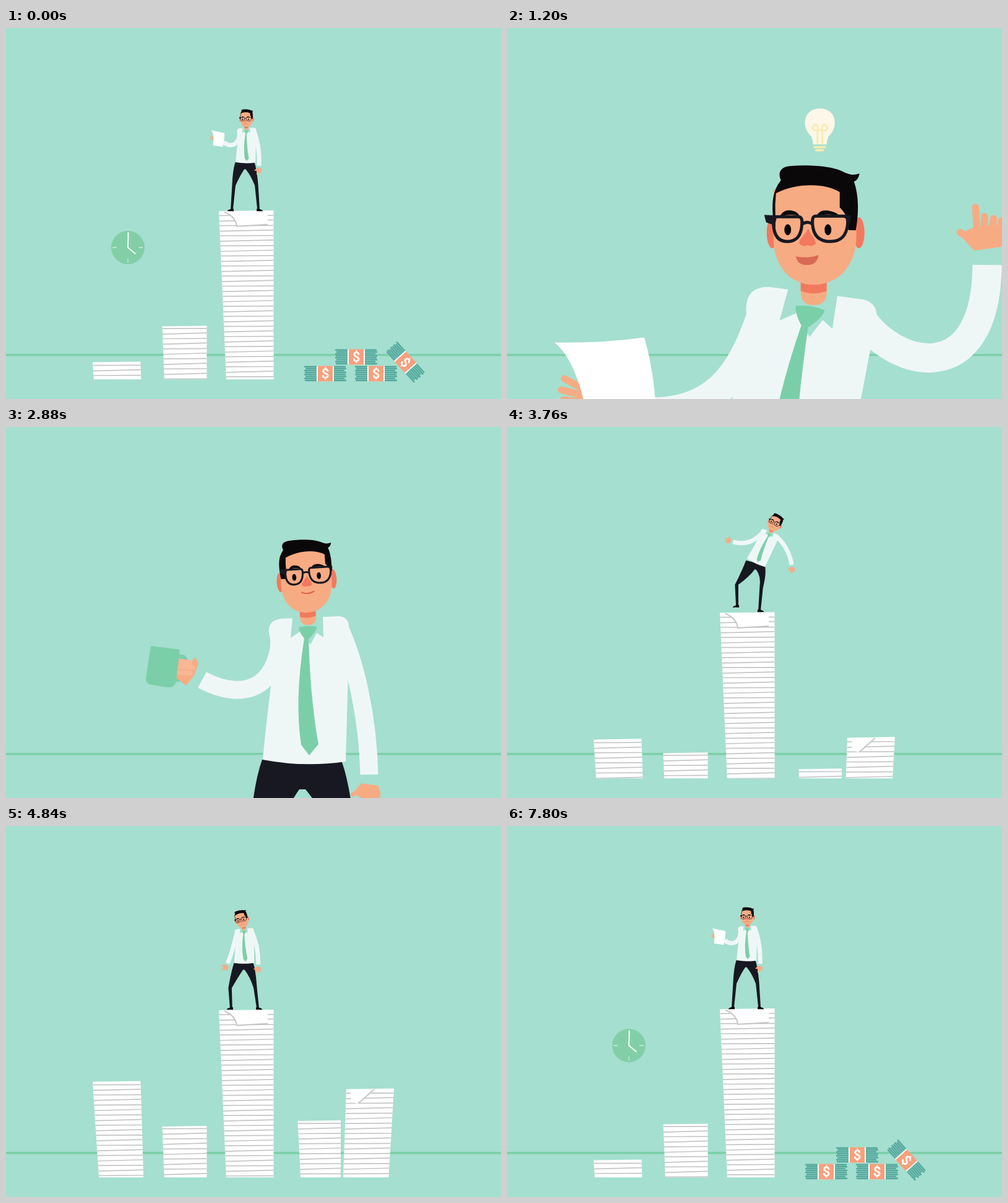
These frames come from a looping animation (800x600 px, 7840 ms). An HTML page with a canvas:

```html
<!DOCTYPE html>
<html lang="en">
<head>
<meta charset="utf-8">
<title>Paperwork</title>
<style>
html, body { margin: 0; width: 100%; height: 100%; overflow: hidden; background: #a5dfcf; }
canvas { display: block; }
</style>
</head>
<body>
<canvas id="stage" width="800" height="600"></canvas>
<script>
const c = document.getElementById('stage').getContext('2d');
const LOOP = 7840, RAD = Math.PI / 180, FLOOR = 568.5;
const BG = '#a5dfcf', GREEN = '#7bcfa8', SHIRT = '#eff7f6', SKIN = '#f7ab83', RED = '#f2795d',
  HAIR = '#0b080a', DARK = '#171821', GREY = '#c6c6c6';

// ---------- timing helpers ----------
const clamp = u => Math.max(0, Math.min(1, u));
const smooth = u => u * u * (3 - 2 * u);
const span = (t, a, b) => clamp((t - a) / (b - a));
const backOut = u => 1 + 2.7 * (u - 1) ** 3 + 1.7 * (u - 1) ** 2;
const mix = (a, b, u) => Array.isArray(a) ? a.map((v, i) => mix(v, b[i], u)) : a + (b - a) * u;

function track(t, keys, ease = u => u) {
  let i = 0;
  while (i < keys.length - 2 && t >= keys[i + 1][0]) i++;
  const [a, b] = [keys[i], keys[i + 1]];
  return mix(a[1], b[1], ease(span(t, a[0], b[0])));
}

// ---------- drawing helpers ----------
function group(x, y, angle, scale, draw) {
  if (scale <= 0.01) return;
  c.save();
  c.translate(x, y);
  c.rotate(angle * RAD);
  c.scale(scale, scale);
  draw();
  c.restore();
}
function fill(d, color) { c.fillStyle = color; c.fill(new Path2D(d)); }
function stroke(d, color, width, cap = 'butt') {
  c.strokeStyle = color;
  c.lineWidth = width;
  c.lineCap = cap;
  c.lineJoin = 'round';
  c.stroke(new Path2D(d));
}
function ellipse(x, y, rx, ry, color) {
  c.fillStyle = color;
  c.beginPath();
  c.ellipse(x, y, rx, ry, 0, 0, 7);
  c.fill();
}
function rotate([x, y], angle) {
  const k = Math.cos(angle * RAD), s = Math.sin(angle * RAD);
  return [x * k - y * s, x * s + y * k];
}

// ---------- poses: limbs are measured from the hip ----------
// body: x, y, scale, lean, head tilt, face shift x, y; mood: mouth, eyes; held: paper, mug, paper angle, hand flip
const armDown = [80, -160, 95, -70, 92, 20], armUp = [125, -155, 218, -131, 219, -257];
const armHold = [-37, -132, -87, -93, -147, -138];
const reading = {
  body: [387, 218, .24, 0, 0, 0, 6], mood: [-1, 1], held: [1, 0, 15, -1],
  left: armHold, right: armDown, legs: [-79, 154, -92, 317, 75, 154, 88, 317]
};
const pose = (base, change) => ({ ...base, ...change });
const close = pose(reading, {
  body: [419, 802, 1.63, 10, 0, 0, 0], mood: [0, 1], held: [1, 0, 0, -1],
  left: [-20, -160, -42, -110, -116, -111]
});
const idea = pose(close, { mood: [1, 1], held: [1, 0, 0, 1], right: armUp });
const medium = pose(idea, { body: [482, 542, 1, 4, 0, 6, 0], held: [0, 0, 0, 1], left: armHold });
const coffee = pose(medium, {
  body: [482, 542, 1, 0, -4, 13, -6], mood: [.5, 1], held: [0, 1, 0, -1],
  left: [-37, -132, -87, -92, -165, -133], right: [83, -162, 103, -72, 105, 20]
});
const relaxed = pose(reading, { mood: [-.3, .1], held: [0, 0, 15, -1], left: [-70, -140, -80, -60, -88, 20] });
const landed = pose(relaxed, { body: [387, 224, .24, -4, 0, 0, 0], mood: [-.5, 1] });
const topple = pose(landed, {
  body: [402, 220, .24, 24, 26, 0, 0], mood: [-1, 1],
  left: [-8, -142, -71, -122, -154, -142], right: [188, -138, 229, -71, 242, 12],
  legs: [-129, 146, -125, 290, 38, 167, 25, 321]
});
const sway = pose(topple, {
  body: [384, 221, .24, -9, -10, 0, 0], left: [-110, -150, -150, -100, -170, -40],
  right: [100, -160, 140, -90, 160, -10], legs: [-90, 160, -84, 310, 78, 160, 97, 310]
});
const slump = pose(relaxed, {
  body: [385, 222, .24, -2, -15, 0, 5], mood: [-1, 1], left: [-71, -133, -79, -71, -112, 0],
  right: [82, -150, 96, -70, 95, 8], legs: [-96, 167, -88, 304, 75, 167, 92, 304]
});
const script = [
  [0, reading], [280, reading], [760, close], [840, close], [1080, idea], [1400, idea],
  [1700, medium], [2040, medium], [2480, coffee], [2920, coffee], [3180, landed], [3380, landed],
  [3740, topple], [3880, topple], [4260, sway], [4700, slump], [5000, slump], [5480, relaxed],
  [6480, relaxed], [6960, reading], [LOOP, reading]
];
function poseAt(t) {
  let i = 0;
  while (i < script.length - 2 && t >= script[i + 1][0]) i++;
  const [[t0, a], [t1, b]] = [script[i], script[i + 1]];
  const u = smooth(span(t, t0, t1)), p = {};
  for (const k in a) p[k] = mix(a[k], b[k], u);
  return p;
}

// ---------- man ----------
function arm(start, [ax, ay, bx, by, x, y]) {
  stroke(`M${start}C${ax} ${ay} ${bx} ${by} ${x} ${y}`, SHIRT, 29);
  ellipse(...start, 15, 15, SHIRT);
}
function openHand([, , bx, by, x, y], flip) {
  group(x, y, Math.atan2(y - by, x - bx) / RAD + 90, 1, () => {
    c.scale(flip, 1);
    fill('M-13-14L14-18L18-32L10-40L-12-38L-28-30Z', SKIN);
    stroke('M-10-22L-27-32M-10-30L-12-57M-3-30L-3-48M4-30L6-46M12-28L14-44', SKIN, 7, 'round');
  });
}
function sheet(x, y, angle, size) {
  group(x - 40, y - 28, angle, size, () => {
    stroke('M-44-5L-18 9M-47 6L-15 14M-45 16L-12 19', SKIN, 7, 'round');
    fill('M-54-41Q-10-40 35-46Q46-10 48 48L-18 55Q-28-20-54-41Z', '#fff');
  });
}
function mug(x, y, size) {
  group(x - 40, y - 20, 0, size, () => {
    c.translate(-277, -389);
    stroke('M279 371C296 370 292 390 290 398Q286 409 273 409', GREEN, 7);
    fill('M275 381L300 383Q303 371 306 373Q311 380 310 385L304 402L291 418L275 406Z', SKIN);
    stroke('M277 378L297 381M278 387L302 389M277 397L298 398', '#f9b796', 8, 'round');
    fill('M234 354L281 360L275 411Q273 422 262 421L234 417Q225 415 226 406Z', GREEN);
  });
}
function legs([kx, ky, fx, fy, mx, my, gx, gy], lean) {
  const [lx, ly] = rotate([-68, -4], lean), [rx, ry] = rotate([61, 0], lean);
  fill(`M${lx} ${ly}Q${lx - 18} ${ly + 50} ${kx - 11} ${ky}L${fx - 8} ${fy}H${fx + 8}L${kx + 12} ${ky}Q-38 88-8 44H2
    Q38 88 ${mx - 12} ${my}L${gx - 8} ${gy}H${gx + 8}L${mx + 11} ${my}Q${rx + 16} ${ry + 45} ${rx} ${ry}Z`, DARK);
  for (const [x, y, side] of [[fx, fy, -1], [gx, gy, 1]])
    fill(`M${x - side * 12} ${y - 8}L${x + side * 10} ${y - 5}Q${x + side * 28} ${y} ${x + side * 30} ${y + 9}H${x - side * 13}Z`, HAIR);
}
function torso() {
  fill('M-54-122L-55-200Q-64-228-38-232L56-236Q70-235 72-222L71-144L67-1Q0 9-67-4Q-62-60-54-122Z', SHIRT);
  fill('M-19-234L-22-201L-7-211L10-190L20-209L31-202L30-237Z', BG);
}
function tie() {
  fill('M0-200Q-16-100-5-28L8-11L23-29Q10-100 7-200Z', GREEN);
  fill('M-9-218Q5-222 20-219Q21-213 8-200H0Q-8-210-9-218Z', GREEN);
}
function head(fx, fy, mouth, eyes) {
  fill('M472 400H514V430Q512 448 493 448Q474 448 472 430Z', SKIN);
  fill('M472 400H514V425Q493 433 472 425Z', RED);
  ellipse(426, 331, 9, 25, RED);
  ellipse(566, 331, 9, 25, RED);
  fill('M428 262V340C428 385 455 415 493 415C532 415 562 385 562 335V262Q495 230 428 262Z', SKIN);
  fill(`M429 322C423 278 428 262 440 246C434 232 441 224 455 223C490 220 525 224 540 232
    C552 238 558 238 567 235Q565 246 558 248C566 270 566 300 561 327Z`, HAIR);
  c.save();
  c.translate(fx, 0);
  fill('M431 340V302Q430 285 432 267C465 250 510 250 535 265V290C540 295 550 305 549 326V340Z', SKIN);
  c.translate(0, fy);
  fill('M483 325C479 336 468 341 470 349Q476 354 483 351Q490 354 496 349C497 340 488 336 485 325Z', RED);
  if (mouth > .75) fill('M464 369Q483 373 501 367Q498 383 483 383Q467 384 464 369Z', '#d96a55');
  else stroke(`M468 ${370 - mouth * 6}Q484 ${370 + mouth * 10} 500 ${369 - mouth * 6}`, '#dc664e', 3.5, 'round');
  ellipse(451, 326, 5.5, 9 * eyes, HAIR);
  ellipse(516, 326, 5.5, 9 * eyes, HAIR);
  fill('M438 305Q444 292 457 295Q468 297 470 304Q455 299 438 305ZM497 304Q503 293 516 295Q530 297 536 305Q518 298 497 304Z', HAIR);
  stroke(`M432 305H468Q475 305 474 316C473 336 465 345 450 345C436 345 429 335 428 318Q427 305 432 305Z
    M496 304H541Q549 304 548 316C546 336 537 345 520 345C502 345 492 336 491 316Q490 304 496 304ZM474 317Q483 311 491 317`, DARK, 5);
  fill('M413 302L434 303L430 319L416 314ZM545 302L553 303L552 314L546 319Z', DARK);
  c.restore();
}
function bulb(size) {
  group(503, 160, 0, size, () => {
    c.translate(-503, -160);
    fill('M489 175C472 160 476 130 503 130C530 130 534 160 517 175Q514 181 514 188H492Q492 181 489 175Z', '#fef7e9');
    stroke('M499 187V165C490 168 489 157 495 156C501 156 499 161 500 165H506C506 161 506 156 511 156C517 158 516 168 507 165V187', '#f8edb0', 3);
    stroke('M494 192.5H511M497 197.5H508', '#f8edb0', 3.6, 'round');
  });
}
function man(t) {
  const { body: [x, y, s, lean, tilt, fx, fy], mood, held: [paper, cup, angle, flip], left, right, legs: g } = poseAt(t);
  group(x, y, 0, s, () => {
    legs(g, lean / 2);
    openHand(right, flip < 0 ? -1 : 1);
    if (paper < .1 && cup < .1) openHand(left, -1);
    arm(rotate([-39, -214], lean), left);
    arm(rotate([56, -219], lean), right);
    group(0, 0, lean, 1, torso);
    group(...rotate([6, -237], lean), tilt, 1 / 1.63, () => {
      c.translate(-493, -423);
      head(fx, fy, ...mood);
      bulb(t < 1500 ? backOut(span(t, 760, 1000)) : 1 - smooth(span(t, 1860, 2060)));
    });
    group(0, 0, lean, 1, tie);
    sheet(left[4], left[5], angle, paper);
    mug(left[4], left[5], cup);
  });
}

// ---------- stacks ----------
function stack(x0, slope0, x1, slope1, top, first, fold) {
  if (top >= FLOOR) return;
  c.save();
  c.beginPath();
  c.rect(0, 0, 800, FLOOR);
  c.clip();
  const end = FLOOR - top;
  const edge = (h, d = 0) => `${x0 + slope0 * h} ${top + h + d}`;
  const far = (h, d = 0) => `${x1 + slope1 * h} ${top + h + d}`;
  fill(`M${edge(0, .6)}L${far(0, -.6)}L${far(end)}L${edge(end)}Z`, '#fff');
  for (let i = 1, h = first; h < end; i++, h += 8.15) {
    const d = i % 2 ? .2 : 1;
    stroke(`M${edge(h, d)}L${far(h, -d)}`, GREY, 1.7);
  }
  c.translate(x0, top);
  if (fold) fold();
  c.restore();
}
function towerFold() {
  fill('M8 1Q27 8 29 25L79 22V1Z', '#fff');
  stroke('M9 2Q27 9 29 25L79 22', GREY, 2);
}
function cornerFold() {
  fill('M7 1H45L19 25L8 20Z', '#fff');
  stroke('M45 1L19 24', GREY, 2);
}
function stacks(t) {
  const top = keys => track(t, keys);
  stack(140, .065, 217.5, .03, top([[80, 540], [480, 590], [3200, 590], [3760, 505], [4840, 413], [5860, 407], [6080, 442], [7260, 540]]), 5.5);
  stack(252.5, .04, 324.5, 0, top([[80, 482], [480, 590], [3200, 590], [3760, 527], [4840, 485.5], [5700, 482]]), 4);
  const tower = track(t, [[200, 295.7], [640, 590], [2920, 590], [3180, 302], [3760, 300], [4840, 297.5], [5700, 295.7]], smooth);
  stack(344, .044, 432.5, 0, tower, 7.5, towerFold);
  group(534, 560, 0, 1 - smooth(span(t, 5880, 6280)), () => {
    if (t < 3000) return;
    c.translate(-534, -560);
    stack(471.5, .05, 541, 0, top([[3560, 570], [3760, 553], [4840, 476.5], [5900, 470]]), 4.5);
    stack(550, -.035, 627, -.06, top([[3200, 590], [3760, 502], [4840, 425], [5900, 419]]), 7, cornerFold);
  });
}

// ---------- clock and money ----------
const popOut = (t, delay) => 1 - smooth(span(t, 80 + delay, 300 + delay));

function clock(t) {
  const size = t < 1000 ? popOut(t, 0) : backOut(span(t, 5640, 5920));
  const minute = t < 1000 ? 2 : 2 - .262 * Math.max(0, 7760 - t);
  group(197, 355, 0, size, () => {
    ellipse(0, 0, 27, 27, '#82cfa7');
    stroke('M0-25V-17M0 18V25M-25 0H-18M17 0H24', '#cfeadb', 1.3);
    group(0, 0, minute, 1, () => stroke('M0 0V-23.5', '#fff', 1.8, 'round'));
    group(0, 0, 130 + (minute - 2) / 12, 1, () => stroke('M0 0V-15.5', '#fff', 1.8, 'round'));
  });
}
function bundle(x, y, angle, size) {
  group(x, y, angle, size, () => {
    for (let i = 0; i < 8; i++) {
      const y0 = -12.5 + i * 3.15, a = [34, 32, 34, 33][i % 4], b = [33, 34, 31, 34][i % 4];
      c.fillStyle = '#55a99e';
      c.fillRect(-a, y0, a + b, 2.5);
      c.fillStyle = '#82c8b8';
      c.fillRect(-32, y0 + 2.5, 64, .65);
    }
    c.fillStyle = '#fff';
    c.fillRect(-14, -12.5, 28, 25);
    c.fillStyle = '#f99f7b';
    c.fillRect(-12, -12.5, 24, 25);
    c.fillStyle = '#fff';
    c.font = '700 22px Roboto, Arial, sans-serif';
    c.textAlign = 'center';
    c.fillText('$', 0, 7.7);
  });
}
function money(t) {
  const swing = t > 6000 ? 7 * Math.exp(-(t - 6170) / 300) * Math.sin((t - 6170) / 90) : 0;
  [[516, 559, 0], [598, 559, 0], [566, 532, 0], [645.5, 540.5, 48 + swing]].forEach(([x, y, angle], i) => {
    const size = t < 1000 ? popOut(t, i * 40) : backOut(span(t, 6000 + i * 54, 6360 + i * 54));
    bundle(x, y, angle, size);
  });
}

const begin = performance.now();
function frame() {
  const t = (performance.now() - begin) % LOOP;
  c.fillStyle = BG;
  c.fillRect(0, 0, 800, 600);
  c.fillStyle = '#7bd0a8';
  c.fillRect(0, 527, 800, 3.5);
  clock(t);
  stacks(t);
  money(t);
  man(t);
  requestAnimationFrame(frame);
}
frame();
</script>
</body>
</html>
```
